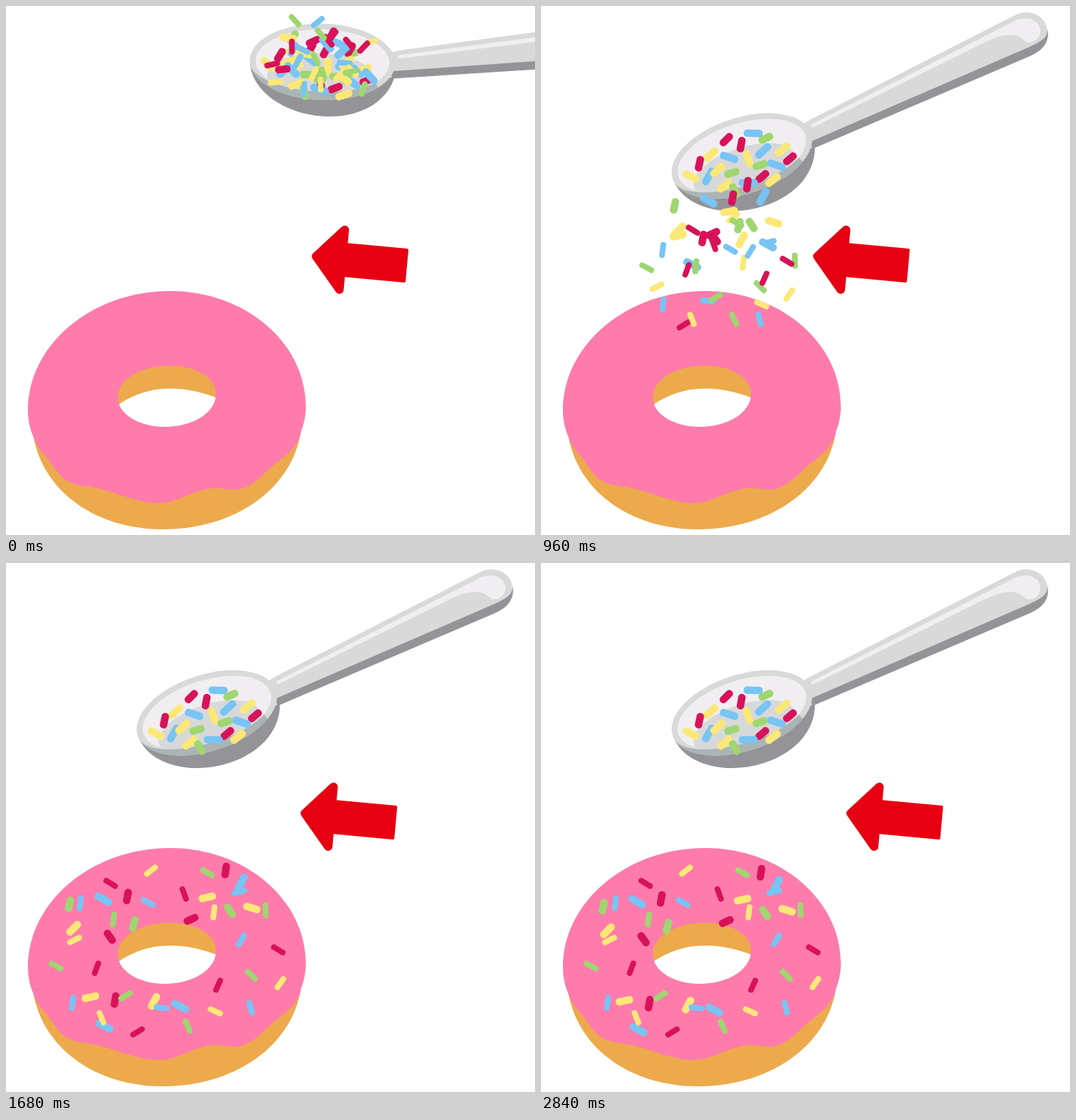
An HTML page with a canvas for the animation above (2880 ms loop, 748 px wide and 748 px high).

```html
<!DOCTYPE html>
<html lang="en">
<head>
<meta charset="utf-8">
<title>Donut sprinkles</title>
<style>
html, body { margin: 0; width: 100%; height: 100%; overflow: hidden; background: #fff; }
canvas { display: block; width: 748px; height: 748px; }
</style>
</head>
<body>
<canvas id="stage" width="748" height="748"></canvas>
<script>
const ctx = document.getElementById('stage').getContext('2d');
const LOOP = 2880, STEP = 40, RAD = Math.PI / 180;

const COLORS = { r: '#d8125a', b: '#78c4f4', y: '#fce877', g: '#9fd670' };
const THICK_LENGTH = { r: 22, b: 27, y: 25, g: 22 };
const RIM = '#d9d9d9', SHINE = '#f0eef1', SHADE = '#949498';

// The spoon swings around this pivot while sliding by this distance.
const PIVOT = [700, 100], SLIDE = [177.3, 11.5], SWING = 19.4 * RAD;

// Each sprinkle: colour, x, y, angle in degrees, in its resting place.
const spoonPile = [
  ['r', 262, 189, -45], ['b', 300, 180, 2], ['g', 318, 187, -25], ['r', 283, 196, -80],
  ['y', 240, 210, -42], ['y', 342, 203, -40], ['b', 314, 205, -42], ['b', 266, 214, 18],
  ['y', 293, 216, 72], ['r', 352, 216, -40], ['r', 224, 223, -78], ['g', 310, 225, -18],
  ['b', 333, 225, 18], ['b', 237, 241, -60], ['y', 250, 232, -42], ['y', 212, 241, 28],
  ['g', 270, 236, -17], ['r', 313, 241, -40], ['y', 328, 246, -38], ['b', 293, 250, 0],
  ['y', 260, 254, -38], ['g', 274, 261, 60]
];

const clusters = [];

// lift: where the cluster lies in the spoon, relative to its resting place.
function cluster(thick, lift, items) {
  clusters.push({ thick, lift, items, duration: thick ? 1290 : 960 });
}

cluster(true, [145, -292.5], [
  ['g', 88, 486, -78], ['b', 136, 479, 30], ['r', 170, 475, -80],
  ['r', 145, 532, 55], ['y', 94, 520, -45], ['g', 179, 514, -75]
]);
cluster(true, [109, -423], [
  ['y', 118, 619, -12], ['r', 153, 623, -80], ['b', 138, 660, 27],
  ['y', 208, 625, -62], ['b', 245, 632, 28]
]);
cluster(true, [-27.5, -266.5], [
  ['r', 311, 438, -82], ['b', 333, 455, -62], ['y', 285, 476, -12],
  ['g', 317, 495, 57], ['y', 348, 491, 17], ['r', 262, 507, -25]
]);
cluster(false, [134, -272], [
  ['y', 97, 533, -27], ['g', 152, 504, -83], ['b', 105, 481, -83],
  ['r', 148, 453, 32], ['b', 201, 480, 30], ['y', 205, 435, -38]
]);
cluster(false, [-16, -262], [
  ['r', 252, 468, 70], ['y', 294, 494, -83], ['g', 367, 491, 88],
  ['b', 330, 465, -15], ['g', 285, 438, 30]
]);
cluster(false, [-74, -372], [
  ['b', 346, 629, 75], ['y', 388, 594, -55], ['g', 347, 583, 45],
  ['r', 385, 547, 31], ['b', 333, 533, -58]
]);
cluster(false, [32, -424], [
  ['g', 257, 655, 66], ['b', 220, 629, 7], ['y', 296, 634, 24],
  ['r', 300, 597, -66], ['r', 186, 663, -32]
]);
cluster(false, [157, -400], [
  ['y', 135, 643, 68], ['b', 94, 622, -82], ['g', 169, 612, -32],
  ['r', 128, 573, -70], ['g', 71, 570, 28]
]);

const shapes = {
  dough: new Path2D('M39 610C54 688 128 740 222 740C322 740 404 684 417 602L380 560H60Z'),
  icing: new Path2D('M31 572C31 479 121 403 232 403C338 403 424 476 424 566C424 580 421 592 417 602' +
    'C414 626 387 641 374 653C360 666 344 684 323 684C312 684 304 681 291 682' +
    'C262 685 242 703 215 703C180 702 150 684 118 680C106 678 92 677 80 667' +
    'C68 655 62 642 52 632C46 626 42 618 39 610C34 598 31 586 31 572Z'),
  hole: new Path2D('M158 553C158 528 190 508.5 232 508.5C270 508.5 297 526 297 548' +
    'C297 574 266 595 224 595C188 595 158 577 158 553Z'),
  through: new Path2D('M150 570C196 534 250 534 305 557V605H150Z'),
  handleShade: new Path2D('M374 180L384 202L690 71.5C710 63 719 51 716.5 34L690 30Z'),
  handle: new Path2D('M368 168Q376 164 383 159.5L670 13C690 3 713 13 716 33C717 45 706 51 688 59L383 191L372 190Z'),
  handleShine: new Path2D('M383 167L664 24C684 12 703 18 706 33C707 45 697 53 688 51' +
    'C680 48 679 41 664 41C652 41 644 44 630 50L386 171Q380 172 383 167Z'),
  bowlShade: new Path2D('M-102.5 0C-102.5 43 -50 77 8 77C60 77 93 51 102 20Z'),
  bowlLip: new Path2D('M-102 8C-92 30 -45 42 0 42C35 42 58 37 76 27L90 60H-110Z')
};

function fill(color, path) {
  ctx.fillStyle = color;
  ctx.fill(path);
}

function ellipse(x, y, rx, ry) {
  const path = new Path2D();
  path.ellipse(x, y, rx, ry, 0, 0, 2 * Math.PI);
  return path;
}

function ease(t, start, duration) {
  const u = Math.min(1, Math.max(0, (t - start) / duration));
  return (1 - Math.cos(Math.PI * u)) / 2;
}

function spoonMatrix(t) {
  const rest = 1 - ease(t, -16, 976);
  return new DOMMatrix()
    .translate(PIVOT[0] + SLIDE[0] * rest, PIVOT[1] + SLIDE[1] * rest)
    .rotate(SWING * rest / RAD)
    .translate(-PIVOT[0], -PIVOT[1]);
}

// Blend from a matrix towards identity.
function release(m, k) {
  const mix = (from, to) => from + (to - from) * k;
  return new DOMMatrix([mix(m.a, 1), mix(m.b, 0), mix(m.c, 0), mix(m.d, 1), mix(m.e, 0), mix(m.f, 0)]);
}

function drawSprinkles(items, thick) {
  for (const [color, x, y, angle] of items) {
    const length = thick ? THICK_LENGTH[color] : 22.5;
    const width = thick ? 10.5 : 8;
    ctx.save();
    ctx.translate(x, y);
    ctx.rotate(angle * RAD);
    ctx.fillStyle = COLORS[color];
    ctx.beginPath();
    ctx.roundRect(-length / 2, -width / 2, length, width, thick ? 4.8 : 3.8);
    ctx.fill();
    ctx.restore();
  }
}

function drawDonut() {
  fill('#ecaa4c', shapes.dough);
  fill('#ff7bac', shapes.icing);
  ctx.save();
  ctx.clip(shapes.hole);
  fill('#ecaa4c', shapes.hole);
  fill('#fff', shapes.through);
  ctx.restore();
}

function drawSpoon() {
  fill(SHADE, shapes.handleShade);
  ctx.save();
  ctx.translate(284, 212);
  ctx.rotate(-18 * RAD);
  fill(SHADE, shapes.bowlShade);
  ctx.restore();

  fill(RIM, shapes.handle);
  fill(SHINE, shapes.handleShine);

  ctx.save();
  ctx.translate(284, 212);
  ctx.rotate(-18 * RAD);
  const rim = ellipse(0, 0, 103, 54);
  fill(RIM, rim);
  ctx.clip(rim);
  const inside = ellipse(0, 0, 94.5, 46);
  fill(SHINE, inside);
  ctx.save();
  ctx.clip(inside);
  fill('#d7d8d9', ellipse(-3, 21, 75, 33));
  ctx.restore();
  fill('#abb4b5', shapes.bowlLip);
  ctx.restore();
}

function drawPolygon(points, lineWidth) {
  ctx.beginPath();
  points.forEach(([x, y]) => ctx.lineTo(x, y));
  ctx.closePath();
  ctx.lineWidth = lineWidth;
  ctx.fill();
  ctx.stroke();
}

function drawArrow(t) {
  const shift = 63.5 * (1 - Math.cos(2 * Math.PI * t / 1440)) / 2;
  ctx.save();
  ctx.translate(-shift, 0);
  ctx.fillStyle = ctx.strokeStyle = '#e60012';
  ctx.lineJoin = 'round';
  drawPolygon([[438.5, 354], [479, 316.5], [471.5, 401]], 12);
  drawPolygon([[475, 336.5], [567, 345], [563, 389], [472, 380.5]], 4);
  ctx.restore();
}

function render(t) {
  ctx.resetTransform();
  ctx.fillStyle = '#fff';
  ctx.fillRect(0, 0, 748, 748);
  drawDonut();
  drawArrow(t);

  const spoon = spoonMatrix(t);
  ctx.setTransform(spoon);
  drawSpoon();
  drawSprinkles(spoonPile, true);

  for (const { thick, lift, items, duration } of clusters) {
    ctx.setTransform(release(spoon.translate(lift[0], lift[1]), ease(t, 480, duration)));
    drawSprinkles(items, thick);
  }
}

const begin = performance.now();

function tick() {
  const t = (performance.now() - begin) % LOOP;
  render(Math.floor(t / STEP) * STEP);
  requestAnimationFrame(tick);
}
tick();
</script>
</body>
</html>
```
